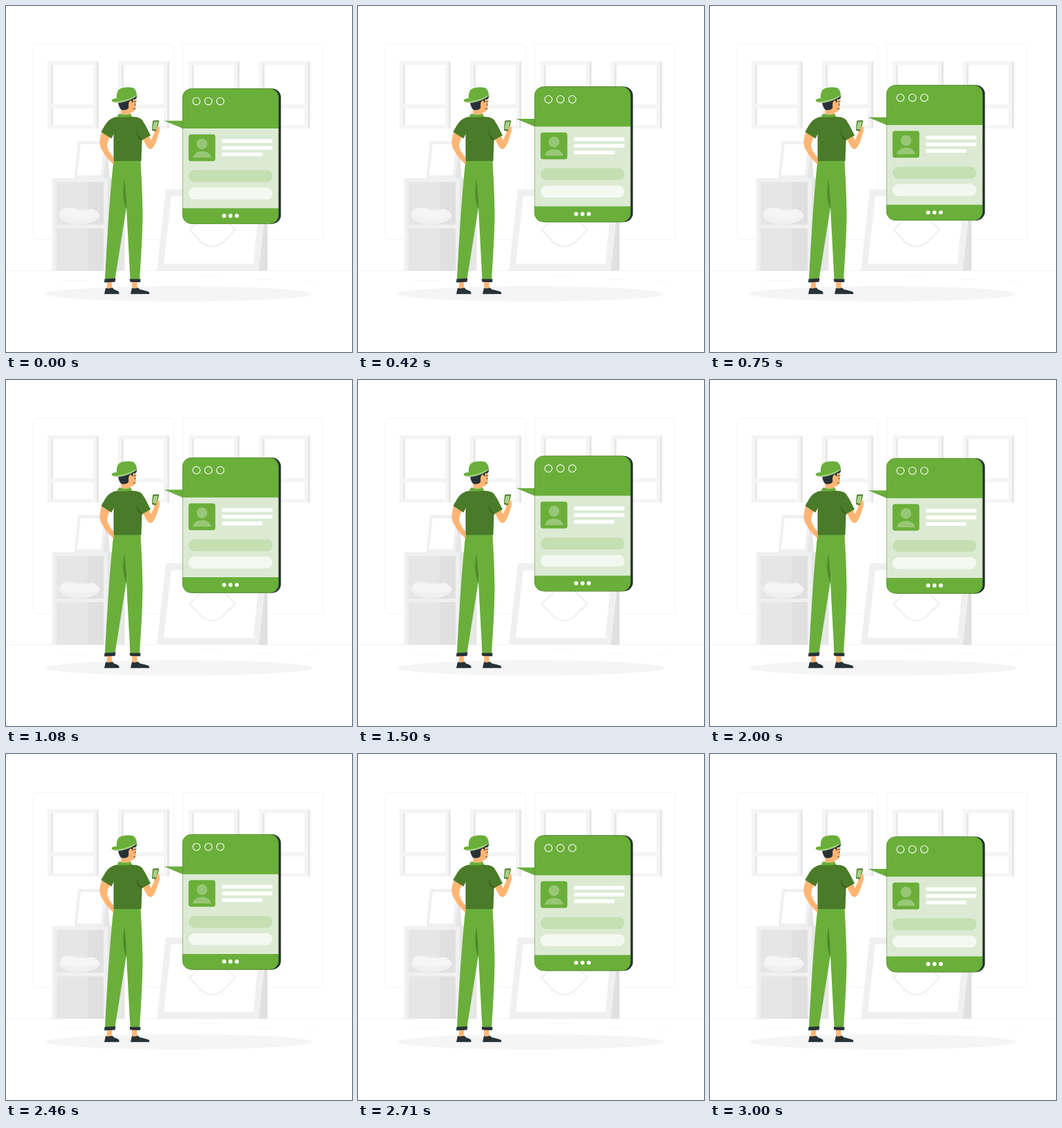
Write an HTML page that moves like this. It is 500 by 500 pixels and loops after 3.04 s.

```html
<!DOCTYPE html>
<html lang="en">
<head>
<meta charset="utf-8">
<title>Courier checking a phone</title>
<style>
  html, body { margin: 0; width: 100%; height: 100%; overflow: hidden; background: #fff; }
  svg { display: block; width: 100vw; height: 100vh; }
  .green { fill: #6aaf3a; }
  .deep { fill: #4a7b29; }
  .skin { fill: #ffb573; }
  .dark { fill: #263238; }
  .g1 { fill: #f5f5f5; }
  .g2 { fill: #f0f0f0; }
  .g3 { fill: #e6e6e6; }
  .g4 { fill: #e0e0e0; }
  .white { fill: #fff; }
  .line { fill: none; stroke: #f5f5f5; }
</style>
</head>
<body>
<svg viewBox="0 0 500 500">
  <defs>
    <g id="window">
      <path class="g3" d="M60.5 80.5H134V177H60.5Z"/>
      <path class="g1" d="M60.5 80.5H131V177H60.5Z"/>
      <path class="g3" d="M65.5 85.5H69V142H65.5ZM65.5 148H69V172H65.5Z"/>
      <path class="white" d="M68 85.5H126V142H68ZM68 148H126V172H68Z"/>
    </g>
    <clipPath id="card"><rect x="255" y="119.5" width="139" height="195.7" rx="13"/></clipPath>
  </defs>

  <!-- room -->
  <g class="line">
    <rect x="39.5" y="55.5" width="203" height="282" rx="3"/>
    <rect x="255.5" y="55.5" width="203" height="282" rx="3"/>
    <path d="M0 382.5H500" stroke="#ebebeb" stroke-width=".6"/>
    <path d="M360 395.5H384M433 398.5H448M278 389.5H312M80 396.5H118" stroke-width=".7"/>
  </g>
  <use href="#window"/>
  <use href="#window" x="102"/>
  <use href="#window" x="203.5"/>
  <use href="#window" x="305.5"/>

  <!-- small canvas and shelf -->
  <path class="g3" d="M146 195L150 249H138Z"/>
  <path class="g2" d="M104 195H147L141 249H98.5Z"/>
  <path class="white" d="M108 199.5H142L137 244.5H103Z"/>
  <path class="g3" d="M140 249H171.5V382.5H140Z"/>
  <path class="g2" d="M67 249H147V382.5H67Z"/>
  <path class="g3" d="M73 254.5H141V316H73ZM73 321.5H141V382.5H73Z"/>
  <path class="g4" d="M118 254.5H141V316H118ZM118 321.5H141V382.5H118Z"/>
  <path class="g2" d="M76 303Q78 297 84 298H128Q135 298 135.500 303C134 311 119 315.500 106 315.500S78 311 76 303Z"/>
  <path class="g1" d="M78 301C78 295 83 292 90 292C97 291 101 293 104 295C109 293 114 295 117 295C124 291 133 295 135 302Q120 309 106 308Q88 308 78 301Z"/>

  <!-- large canvas -->
  <path class="g4" d="M376 265H378V382.5H364Z"/>
  <path class="g2" d="M231 265H378L365.500 382.500H218Z"/>
  <path class="white" d="M239 275H367L357.500 372.500H228Z"/>
  <path d="M290 301L265 323L278 337C290 351 305 351 317 338L331.500 323L308 301"
    fill="none" stroke="#ebebeb" stroke-width="1.6" stroke-linejoin="round"/>

  <ellipse class="g1" cx="249.500" cy="416" rx="193.500" ry="11"/>

  <!-- legs -->
  <path class="skin" d="M146.500 398H153.500L152.500 409H145.500ZM182 398H189.500V409H182.500Z"/>
  <path class="dark" d="M144 407.500Q149 409 154 407L156 409.500L162 412Q164 413 163.500 416.200H142Z"/>
  <path class="dark" d="M182 407.500Q187 409 190.500 407L194 409.500L205 412.500Q208 413.500 207 416.200H180Z"/>
  <path d="M154 407L157 410M191 407L195 410" stroke="#d4e6c7" stroke-width=".9"/>
  <path class="green" d="M155.500 223.500H194.500C196 250 197.500 280 197.500 304C197 335 195 365 193 395H179.500L174 291L157.500 395H143C146 340 150 270 155.500 223.500Z"/>
  <path fill="#528a2d" d="M171 249C168.500 265 168 280 173.500 293L174 280Z"/>
  <path class="dark" d="M142.500 394.500L158.500 393.500L157.500 398.800L142 399.500ZM178.500 394.500H194.500L194 399.200L179.500 398.800Z"/>

  <!-- arms and torso -->
  <path class="skin" d="M139 181C135 192 134 199 138 207C143 217 149 223 155.500 229V219C151 214 147 207 146 203C146 197 149 192 151 188Z"/>
  <path class="skin" d="M197 191L206 186L209.500 194L214 184L214.500 177L219 172.500L221.500 175L222 181C219 190 217 198 213 204C210 208 207 207 204 204Z"/>
  <path class="deep" d="M154 162C158 160 162 160 166 160H179C188 160 194 161 197 165C202 172 205 180 209 187L196.500 194L195.500 224H155.500V185L152.500 191.500L137.500 182C142 174 146 165 154 162Z"/>
  <path fill="#3a6120" d="M188.500 180C188.500 186 191 192 196.500 194.500V192C192 189 190 185 188.500 180Z"/>
  <path class="green" d="M161.500 157.500L164 155.500Q173 158 180 155L182 159.800Q172 161.500 161 160.500Z"/>

  <!-- phone -->
  <path class="deep" d="M213 165.500L220.500 165.200Q221.500 165.500 221 167L218 179.500Q217.500 181 216 180.700L211.500 180Q210.500 179.500 211 178L212 166.500Z"/>
  <path fill="#a8d08a" d="M213.500 167.500L219.800 167.200L217 178.500L211.800 178Z"/>
  <path class="skin" d="M219 173L221.500 175.500L221 181L217.500 181.500L217 178Z"/>

  <!-- head -->
  <path class="skin" d="M166 147L183 132L187.500 133L188 139L187.500 148C186 152 183 154 179.500 154V156Q173 158 166.500 155.500Z"/>
  <path class="dark" d="M162 137L189 129.500Q189.500 133 187 134.500L183.500 135Q184 138 182.500 140L181 136.500Q177 137 178 142L176.500 148.500Q171 152 166 149.500Q162 144 162 137Z"/>
  <path class="skin" d="M177.500 139.500C180 135 183.500 138 182 142C180.500 146 177 146 177 143Z"/>
  <path d="M184.500 138.500L188.500 137.500M186.500 141V143.500M184 149L187 148.500" fill="none" stroke="#263238" stroke-width=".9"/>
  <path class="green" d="M160 133.500C159.500 126 161 121 166 119C172 117 180 117 184 118.500C188 121 189 126 189 130.500L178 136L162 138Z"/>
  <path fill="#a6d087" d="M153 136.500C158 134.500 164 134 171 133L189 129.500C184 134 174 138.500 164 140Q155 140.500 153 136.500Z"/>
  <path class="green" d="M152.500 136C154 133.500 160 133 167 132.500L187 129.500C178 134.500 167 138 155 138.500Q153 138 152.500 136Z"/>

  <!-- floating card -->
  <g id="bubble">
    <rect class="dark" x="258.500" y="119.500" width="138.800" height="195.700" rx="13"/>
    <path class="green" d="M229.500 166H257V177.500Z"/>
    <path d="M229.500 166L256 177.300" stroke="#4a7b29" stroke-width=".5"/>
    <g clip-path="url(#card)">
      <path class="green" d="M255 119H394V316H255Z"/>
      <path fill="#dcead3" d="M255 177.200H394V292.500H255Z"/>
    </g>
    <rect x="255.200" y="119.700" width="138.600" height="195.300" rx="13" fill="none" stroke="#4a7b29" stroke-width=".5"/>
    <g fill="none" stroke="#fff" stroke-width="1.100">
      <circle cx="275.200" cy="137.800" r="5.300"/>
      <circle cx="292.500" cy="137.800" r="5.300"/>
      <circle cx="309.700" cy="137.800" r="5.300"/>
    </g>
    <rect class="green" x="263.800" y="185.700" width="38.700" height="38.700" rx="3.500"/>
    <g fill="#97c776">
      <circle cx="283.200" cy="199.500" r="7.800"/>
      <path d="M270 219.500C271 213 277 210 283.200 210S295.500 213 296.500 219.500Z"/>
    </g>
    <path class="white" d="M312 192.700H385V198H312ZM312 202.400H385V207.700H312ZM312 212H370.500V217.300H312Z"/>
    <rect x="263.800" y="237.600" width="121.500" height="17.200" rx="8.600" fill="#c5dfb3"/>
    <rect x="263.800" y="262.500" width="121.500" height="17.200" rx="8.600" fill="#f3f8f0"/>
    <g class="white">
      <circle cx="315.200" cy="303.500" r="2.900"/>
      <circle cx="324.400" cy="303.500" r="2.900"/>
      <circle cx="333.600" cy="303.500" r="2.900"/>
    </g>
  </g>
</svg>
<script>
  const LOOP = 3040, STEPS = 73, RISE = 10;
  const bubble = document.getElementById('bubble');
  // 24 steps a second, each start rounded to 10 ms
  const starts = Array.from({ length: STEPS }, (_, i) => Math.round(i * 100 / 24) * 10);

  function draw() {
    const t = performance.now() % LOOP;
    const step = starts.filter(s => s <= t).length;
    const phase = step / STEPS;
    const lift = RISE * (1 - Math.abs(1 - 2 * phase));
    bubble.setAttribute('transform', `translate(0 ${-lift.toFixed(3)})`);
    requestAnimationFrame(draw);
  }
  draw();
</script>
</body>
</html>
```
